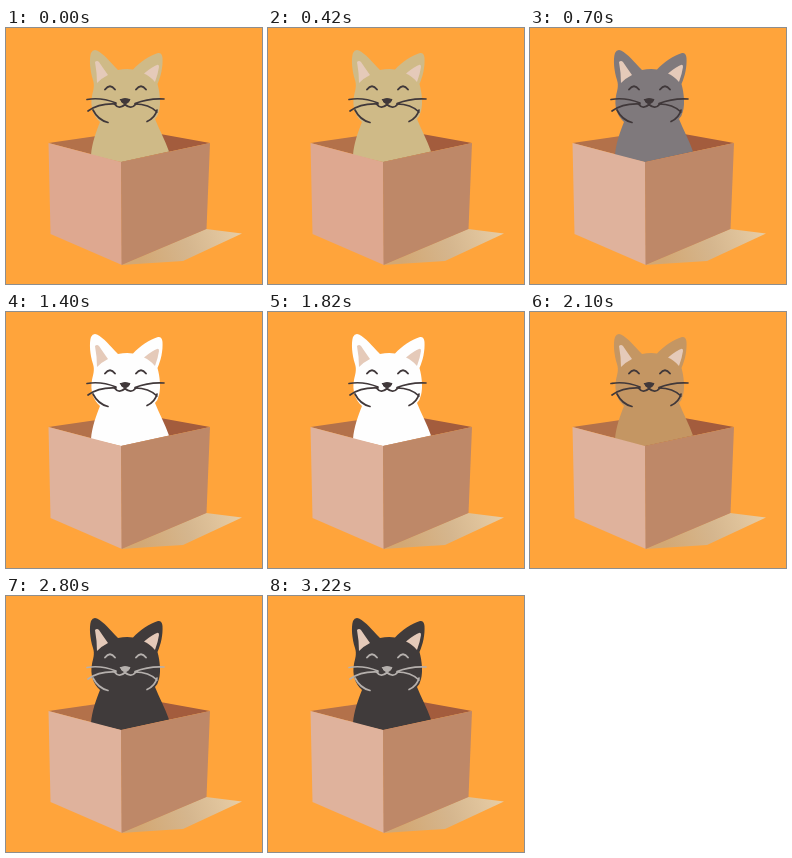
These frames come from a looping animation (256 px wide and 256 px high, 3.5 s). An HTML page:

```html
<!DOCTYPE html>
<html lang="en">
<head>
<meta charset="utf-8">
<title>Cats in a box</title>
<style>
  html, body { margin: 0; width: 100%; height: 100%; overflow: hidden; background: #ffa43b; }
  svg { display: block; width: 100vw; height: 100vh; }
  #face { fill: none; stroke: var(--line); stroke-width: 1.9; stroke-linecap: round; stroke-linejoin: round; }
</style>
</head>
<body>
<svg viewBox="0 0 256 256">
  <defs>
    <linearGradient id="shade" gradientUnits="userSpaceOnUse" x1="135" y1="236" x2="230" y2="205">
      <stop offset="0" stop-color="#d3a874"/>
      <stop offset=".5" stop-color="#d5b68e"/>
      <stop offset="1" stop-color="#e6cba3"/>
    </linearGradient>
  </defs>

  <path fill="url(#shade)" d="M115 237L200 201L236 205.500L177 233Z"/>
  <path fill="#b3714a" d="M42.500 115L132 102L132 130L115 134Z"/>
  <path fill="#a35c3d" d="M132 102L204 115L115 134Z"/>

  <g id="cat">
    <path fill="var(--fur)" d="M85 127C86 115 90 104 94 94C87 88 84 78 86 68C87 63 89 58 87 52
      C84 43 83 31 85 25Q87 21 91 22.500C98 26 104 34 112 42Q120 40.500 127 41.500
      C134 34 143 28 152 25Q156 24.500 156.500 30C157 39 155 48 151.500 56
      C154 65 155 76 153 83Q152 88 149 91C153 101 159 112 163 123.500L115 134Z"/>
    <path fill="var(--ear)" d="M89 34Q91 32 93 34Q97 40 102 47Q96 50 91 55Q91 45 89 34Z
      M151 37Q147 38 138 45.500Q144 48 149 54Q152 46 153 39Q153 36 151 37Z"/>
    <g id="face">
      <path d="M99 61.500Q104 55 109 61.500M130 61.500Q135 55 140 61.500"/>
      <path d="M108.500 76Q113 82 119 76.500Q125 82 130 76"/>
      <path fill="var(--line)" stroke-width="1" d="M114.500 71.500Q119 69.500 124 71.500Q123 75 119 76Q115 75 114.500 71.500Z"/>
      <path stroke-width="1.700" d="M81 71.500Q95 69 110 75M82 83Q93 75 110 76M87 82Q92 92 102 94.500
        M129 75.500Q143 70 158 71M129 76Q143 76 151 84M141 93.500Q149 90 151 82"/>
    </g>
  </g>

  <path id="front" d="M42.500 115L115 134L116 237L44.500 206Z"/>
  <path fill="#be8868" d="M115 134L204 115L200.500 201L115.500 237Z"/>
</svg>
<script>
  const HOLD = 700;
  const DARK = '#40383a', PINK = '#e5cab9', PALE = '#dfb29c';
  const looks = [
    { fur: '#cfba87', line: DARK, ear: PINK, front: '#dea890' },
    { fur: '#7f797c', line: DARK, ear: PINK, front: PALE },
    { fur: '#fefefe', line: DARK, ear: PINK, front: PALE },
    { fur: '#c49663', line: DARK, ear: PINK, front: PALE },
    { fur: '#403b3b', line: '#b5b0ad', ear: PINK, front: PALE }
  ];
  const cat = document.getElementById('cat');
  const front = document.getElementById('front');
  const start = performance.now();

  function draw() {
    const time = performance.now() - start;
    const look = looks[Math.floor(time / HOLD) % looks.length];
    for (const part of ['fur', 'line', 'ear']) cat.style.setProperty('--' + part, look[part]);
    front.setAttribute('fill', look.front);
    requestAnimationFrame(draw);
  }
  draw();
</script>
</body>
</html>
```
